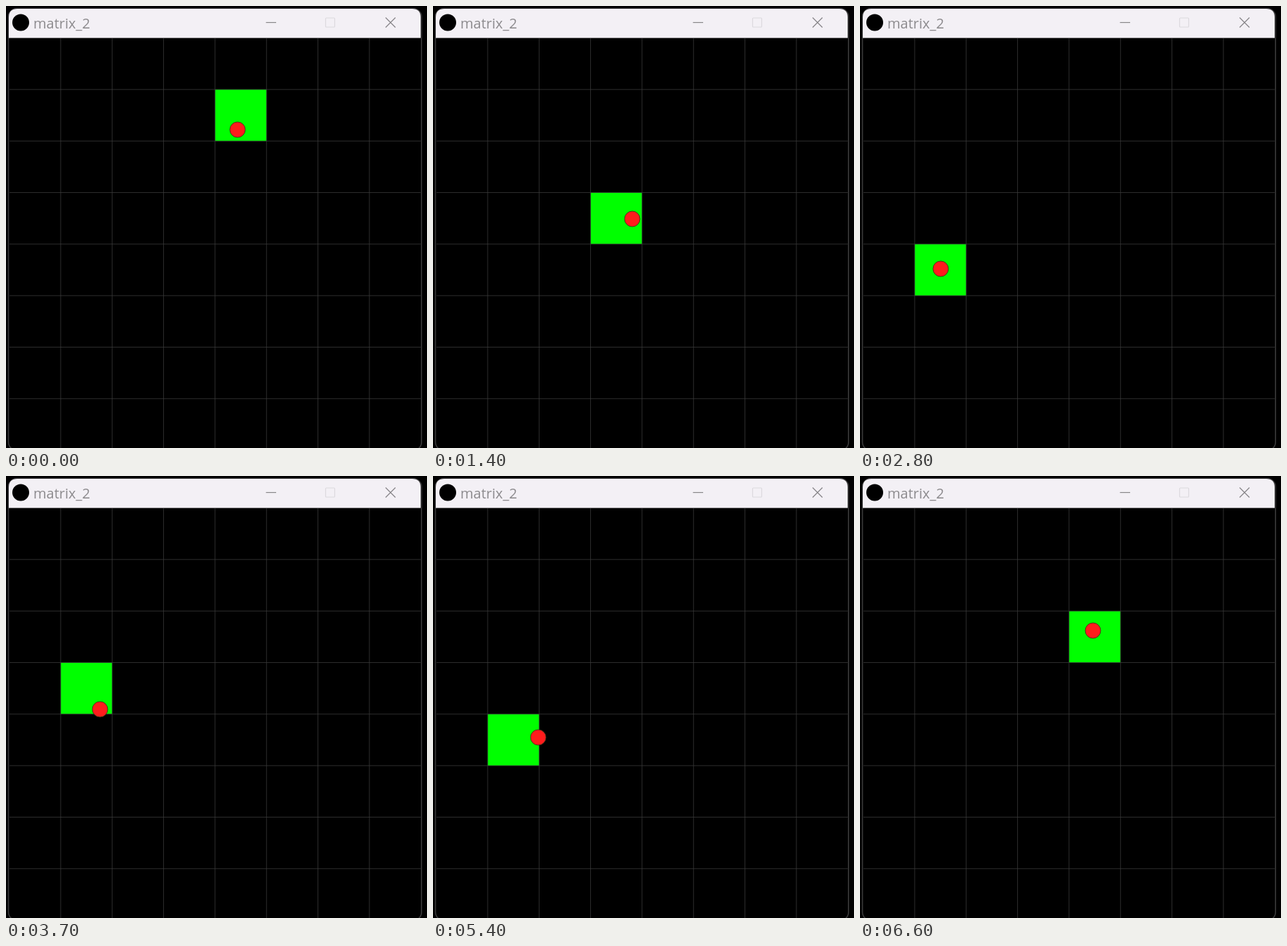
Animation, 600 px wide and 629 px high, one loop 6.7 s. Source, as an HTML page:

```html
<!DOCTYPE html>
<html lang="en">
<head>
<meta charset="utf-8">
<title>matrix_2</title>
<style>
  html, body { margin: 0; width: 100%; height: 100%; overflow: hidden; background: #000; }
  svg { display: block; }
  text { font: 20px "Open Sans", "Noto Sans", sans-serif; fill: #8c8a8d; }
  .icon { fill: none; stroke: #878588; stroke-width: 1.2; }
  #grid { stroke: #3a3a3a; stroke-width: .8; }
  #cell { fill: #0f0; }
  #ball { fill: #ff1c1c; stroke: #403418; stroke-width: .9; }
</style>
</head>
<body>
<svg width="600" height="629" viewBox="0 0 600 629">
  <rect width="600" height="629" fill="#000"/>
  <rect x="3.5" y="3.5" width="588.7" height="629" rx="12" fill="none" stroke="#3a3a3a" stroke-width="1.6"/>
  <path d="M4 45.5V16Q4 4 16 4H579Q591 4 591 16V45.5Z" fill="#f3f0f5"/>
  <circle cx="21" cy="23.5" r="12" fill="#000"/>
  <text x="39" y="32">matrix_2</text>
  <path class="icon" d="M370.5 23.5H385"/>
  <rect class="icon" x="455.5" y="17" width="13" height="13" rx="1" style="stroke:#dcd9de"/>
  <path class="icon" d="M541 16.5L555 30.5M555 16.5L541 30.5"/>
  <rect id="cell"/>
  <path id="grid"/>
  <circle id="ball" r="11"/>
</svg>
<script>
const LEFT = 4.6, TOP = 45.5, SIZE = 73.33;
const STEP = 100, LOOP = 6700;
const $ = id => document.getElementById(id);
const cell = $("cell"), ball = $("ball");

// Turning points of the pointer's path
const turns = [
  { at: 0, x: 330, y: 176 },
  { at: 7, x: 274, y: 293 },
  { at: 9, x: 266, y: 334 },
  { at: 11, x: 239, y: 300 },
  { at: 14, x: 284, y: 303 },
  { at: 17, x: 205, y: 375 },
  { at: 20, x: 229, y: 406 },
  { at: 24, x: 212, y: 346 },
  { at: 28, x: 115, y: 374 },
  { at: 30, x: 83, y: 340 },
  { at: 33, x: 116, y: 285 },
  { at: 37, x: 134, y: 332 },
  { at: 40, x: 130, y: 422 },
  { at: 42, x: 87, y: 440 },
  { at: 45, x: 95, y: 395 },
  { at: 48, x: 123.5, y: 415 },
  { at: 51, x: 96, y: 450 },
  { at: 54, x: 150, y: 372 },
  { at: 59, x: 282, y: 248 },
  { at: 63, x: 342, y: 155 },
  { at: 66, x: 332, y: 220 }
];

function slope(i, axis) {
  const a = turns[Math.max(i - 1, 0)], b = turns[Math.min(i + 1, turns.length - 1)];
  return (b[axis] - a[axis]) / (b.at - a.at);
}

// Cubic Hermite curve through the turning points
function position(step, axis) {
  const next = turns.findIndex(turn => turn.at > step);
  const i = (next < 0 ? turns.length - 1 : next) - 1;
  const a = turns[i], b = turns[i + 1], span = b.at - a.at;
  const u = (step - a.at) / span, v = 1 - u;
  return v * v * (1 + 2 * u) * a[axis] + u * u * (3 - 2 * u) * b[axis]
    + span * u * v * (v * slope(i, axis) - u * slope(i + 1, axis));
}

let lines = "";
for (let i = 1; i < 8; i++) {
  lines += `M${LEFT + i * SIZE} 46V629M5 ${TOP + i * SIZE}H591`;
}
$("grid").setAttribute("d", lines);
cell.setAttribute("width", SIZE);
cell.setAttribute("height", SIZE);

const snap = (value, origin) => origin + Math.floor((value - origin) / SIZE) * SIZE;

function draw(time) {
  const step = Math.floor((time % LOOP) / STEP);
  const x = position(step, "x"), y = position(step, "y");
  ball.setAttribute("cx", x);
  ball.setAttribute("cy", y);
  cell.setAttribute("x", snap(x, LEFT));
  cell.setAttribute("y", snap(y, TOP));
}

const start = performance.now();
function tick() {
  draw(performance.now() - start);
  requestAnimationFrame(tick);
}
tick();
</script>
</body>
</html>
```
